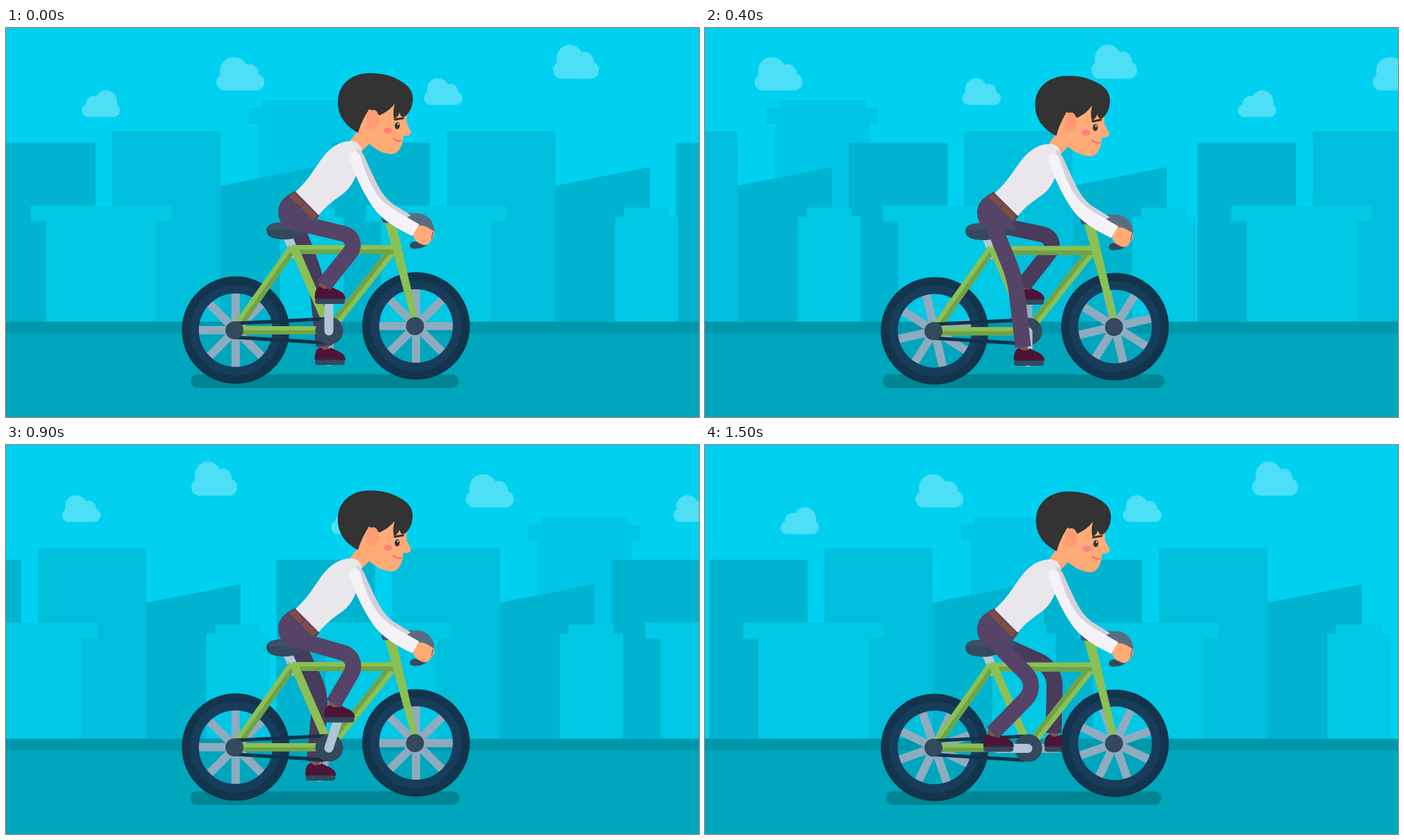
Animation, 998 px wide and 561 px high, one loop 1600 ms. Source, as an HTML page with a canvas:

```html
<!DOCTYPE html>
<html lang="en">
<head>
<meta charset="utf-8">
<title>City ride</title>
<style>
html, body { margin: 0; width: 100%; height: 100%; overflow: hidden; background: #00d1f1; }
canvas { display: block; width: 998px; height: 561px; }
</style>
</head>
<body>
<canvas id="stage" width="998" height="561"></canvas>
<script>
const ctx = document.getElementById('stage').getContext('2d');
const LOOP = 1600, STEP = 100, TAU = Math.PI * 2;
const NAVY = '#34495e', GREEN = '#8bc054', MOSS = '#6fa349', SKIN = '#ffab78', HAIR = '#333333';
const NEAR = '#554467', FAR = '#483b5b';

function rect(x, y, w, h, c) { ctx.fillStyle = c; ctx.fillRect(x, y, w, h); }
function shape(d, c) { ctx.fillStyle = c; ctx.fill(new Path2D(d)); }
function oval(x, y, rx, ry, c, turn = 0) {
  ctx.fillStyle = c;
  ctx.beginPath();
  ctx.ellipse(x, y, rx, ry, turn, 0, TAU);
  ctx.fill();
}
function pill(x, y, w, h, c) {
  ctx.fillStyle = c;
  ctx.beginPath();
  ctx.roundRect(x, y, w, h, h / 2);
  ctx.fill();
}
function line(x1, y1, x2, y2, w, c, cap = 'butt') {
  ctx.lineWidth = w;
  ctx.strokeStyle = c;
  ctx.lineCap = cap;
  ctx.beginPath();
  ctx.moveTo(x1, y1);
  ctx.lineTo(x2, y2);
  ctx.stroke();
}
function group(draw, dx = 0, dy = 0) {
  ctx.save();
  ctx.translate(dx, dy);
  draw();
  ctx.restore();
}

// Scenery
function cloud(x, y, w, h, flip) {
  group(() => {
    if (flip) ctx.translate(w, 0);
    ctx.scale((flip ? -w : w) / 69, h / 48);
    const c = '#4cdff6';
    pill(0, 24, 69, 24, c);
    oval(25, 20, 20, 20, c);
    oval(47, 24, 14, 14, c);
    rect(12, 24, 45, 14, c);
  }, x, y);
}
function clouds(s) {
  for (const dx of [-57.9 * s, 59.87 * (15 - s)]) {
    cloud(109 + dx, 90, 55, 38.5, true);
    cloud(303 + dx, 42, 69, 48);
    cloud(602 + dx, 72.5, 55.5, 38.5);
    cloud(788 + dx, 24, 66, 49);
  }
}
function tower() {
  const c = '#00c5e6';
  rect(60, 104, 124, 12, c);
  rect(41, 115, 161, 23, c);
  rect(54, 137, 136, 287, c);
}
function blocks() {
  rect(-322, 165.5, 142, 259, '#00b4cf');
  rect(-156, 149, 156, 275, '#00bfdc');
  shape('M0 227.5 L136 200.5 V424 H0 Z', '#00b4cf');
}
function fronts() {
  const c = '#00c8e5';
  rect(-273, 256, 203, 23, c);
  rect(-251, 278, 159, 146, c);
  rect(99, 259, 65, 14, c);
  rect(86, 272, 91, 152, c);
}
function city(s) {
  const a = 309 - 65.45 * s, b = 1287 - 63.94 * s;
  const all = [a, a + 482, b, b + 482];
  group(tower, a);
  group(tower, b);
  all.forEach(x => group(blocks, x));
  all.forEach(x => group(fronts, x));
  rect(0, 423.5, 998, 18, '#0097ac');
  rect(0, 440.5, 998, 121, '#00a6bb');
}

// Bicycle
function wheel(x, y, deg) {
  group(() => {
    ctx.rotate(deg * Math.PI / 180);
    for (let i = 0; i < 4; i++) {
      line(-56, 0, 56, 0, 12, '#8eabc0');
      ctx.rotate(Math.PI / 4);
    }
    for (const [r, w, c] of [[59.5, 13, '#173d5a'], [71.5, 12, '#12344c']]) {
      ctx.lineWidth = w;
      ctx.strokeStyle = c;
      ctx.beginPath();
      ctx.arc(0, 0, r, 0, TAU);
      ctx.stroke();
    }
  }, x, y);
}
function tube(x1, y1, x2, y2, w) {
  const len = Math.hypot(x2 - x1, y2 - y1);
  const nx = (y1 - y2) / len * w / 4, ny = (x2 - x1) / len * w / 4;
  line(x1, y1, x2, y2, w, GREEN);
  line(x1 + nx, y1 + ny, x2 + nx, y2 + ny, w / 2, MOSS);
}
function frame() {
  line(406, 302, 418, 330, 13, '#b3c8d8');
  tube(329, 436, 413, 317, 13);
  tube(557, 320, 473, 426, 13);
  tube(412, 319.5, 560, 319.5, 13);
  line(414, 315, 465, 432, 12, GREEN);
  shape('M545.5 279 L561 279 L593 418 L584 420 Z', GREEN);
  tube(335, 436, 452, 436, 12);
  line(330, 426, 460, 419.5, 5, '#12324a');
  line(330, 446, 460, 454, 5, '#12324a');
  oval(329, 436, 13, 13, NAVY);
  oval(589, 430, 13, 13, NAVY);
  oval(465.5, 436.5, 20, 20, NAVY);
}
function saddle() {
  shape('M375 292 C375 281 389 280 401 280.5 L441 282 C448 284 449 292 441 293.5 C425 296 420 305 402 305 C384 305 375 301 375 292 Z', NAVY);
  shape('M376 290 C378 281 390 280 401 280.5 L441 282 C445 283 447 287 446 290 Z', '#3e5266');
}
function handlebar() {
  shape('M541 274 C541 270 545 269 552 269 L584 267 L588 281 H545 C541 281 541 277 541 274 Z', '#465a6d');
  shape('M566 268 L591 267 C607 267 617 280 616.5 293 C616 300 612 306 607 310 L566 272 Z', '#586e80');
  shape('M606 303 L614 302 C609 313 602 318 588 318.5 C579 318 580 309 588 308 C596 308 601 307 606 303 Z', NAVY);
}

// Rider: knee positions over the eight-beat pedal cycle
const KNEE = [[0, 512, 303], [2, 504, 322], [2.8, 495, 335], [4, 447, 362], [6, 480, 348], [6.8, 483, 336], [8, 512, 303]];
function knee(p) {
  const i = KNEE.findIndex(k => k[0] > p);
  const [t0, x0, y0] = KNEE[i - 1], [t1, x1, y1] = KNEE[i];
  const f = (p - t0) / (t1 - t0);
  return [x0 + (x1 - x0) * f, y0 + (y1 - y0) * f];
}
function pedal(p, b) {
  const a = p * Math.PI / 4;
  return [465 + 44 * Math.sin(a), 437 + b - 44 * Math.cos(a)];
}
function crank(p, b, c) {
  const [x, y] = pedal(p, b);
  line(465, 437 + b, x, y, 13, c, 'round');
}
function leg(p, b, hx, hy, c) {
  const [fx, fy] = pedal(p, b);
  group(() => {
    rect(-14, -26, 14, 14, '#7b5650');
    shape('M-20 -2 C-21 -12 -18 -20 -12 -20 C-7 -15 -1 -17 3 -20 C11 -15 24 -13 24 -2 Z', '#4e1436');
    pill(-20, -3, 43, 8, NAVY);
    line(-18, -2.5, 22, -2.5, 1.5, '#2b3449');
  }, fx, fy);
  const [kx, ky] = knee(p);
  const ax = fx - 7, ay = fy - 22;
  // the bend starts at a fixed distance from the knee
  const bend = Math.atan2(hy - ky, hx - kx) - Math.atan2(ay - ky, ax - kx);
  const half = Math.acos(Math.cos(bend)) / 2;
  ctx.lineWidth = 23;
  ctx.strokeStyle = c;
  ctx.lineCap = 'butt';
  ctx.beginPath();
  ctx.moveTo(hx, hy);
  ctx.arcTo(kx, ky, ax, ay, 26 * Math.tan(half));
  ctx.lineTo(ax, ay);
  ctx.stroke();
}
function hips() {
  shape('M417 235 C401 242 391 252 392 267 C393 281 402 291 416 294 L438 288 L452 270 Z', NEAR);
  shape('M407.5 242 L415 238 L448.5 269.5 L442.5 276.5 Z', '#7f4e43');
  line(424, 259, 431, 251, 1.5, NEAR);
}
function torso() {
  shape('M417 236 C436 219 444 203 455 188 C467 172 481 163 496 163 C507 163 513 170 512 181 C508 206 502 224 489 236 C474 248 464 253 450.5 270 Z', '#e9e7ec');
}
function arm() {
  shape('M505 173 C514 176 518 190 526 207 C536 229 542 241 556 253 L583 270 L566 280 L515 220 Z', '#d4d1db');
  shape('M587 288 C593 283 600 284 606 287 L616 293 C618 298 616 303 612 306 C610 313 603 315 597 311 C588 308 584 300 587 288 Z', SKIN);
  line(615, 294, 613, 304, 1.5, '#8c5f55');
  shape('M495 191 C491 177 506 174 510.5 185 C517 209 527 233 541 248 C555 262 575 271 595 283 L585 300 C562 289 541 276 529 259 C514 237 504 215 495 191 Z', '#f4f2f7');
}
function head() {
  shape('M508 146 L520 112 L576 108 L577 137 L583 149 C584 154 580 156 572 155.5 C572 168 566 182 555 182 C541 181 531 174 523 167 L512 178 L493 166 Z', SKIN);
  shape('M507 151 C488 141 478 126 478 107 C478 80 499 65 524 65 C545 65 558 70 571 78 C584 86 588 97 585 110 C583 119 579 124 574 128 C569 129 568 126 567 122 C565 127 562 130 559 131 C557 124 558 117 560 109 C552 119 546 122 538 126 L523 117 C517 127 511 137 507 151 Z', HAIR);
  oval(528, 132, 9, 14, '#ff9b72', 0.1);
  oval(550, 148, 6, 4.3, '#ff7f7d');
  oval(563.5, 141, 3.6, 5, HAIR, 0.1);
  oval(564.5, 138.8, 1, 1.3, '#ffffff');
  line(560, 132, 572, 130, 3, HAIR, 'round');
  ctx.lineWidth = 1.8;
  ctx.strokeStyle = '#f0675f';
  ctx.stroke(new Path2D('M558 159 Q562 164 569 163'));
}

function draw(s) {
  // the pedalling eases off for a few beats mid-loop
  const p = (s - 0.2 * Math.min(5, Math.max(0, s - 6))) % 8;
  const far = (p + 4) % 8;
  const b = 1 - Math.abs(4 - p) / 4;
  const spin = s % 9 * 135 / 7;

  rect(0, 0, 998, 561, '#00d1f1');
  clouds(s);
  city(s);
  pill(266 - 10 * b, 499.5, 386 + 20 * b, 19.5, '#008594');

  crank(far, b, '#92aabe');
  leg(far, b, 417, 283, FAR);
  wheel(330.7, 435.7 + b, spin);
  wheel(590.5, 429.7 + b, spin);
  group(frame, 0, 1.2 * b);
  crank(p, b, '#b0c5d6');
  group(saddle, 0, b);
  leg(p, b, 413, 279, NEAR);
  group(hips, 0, b);
  group(() => {
    ctx.translate(565, 180);
    ctx.rotate(-2 * b * Math.PI / 180);
    ctx.translate(-565, -180);
    head();
  }, 0, 2.5 * b);
  group(() => {
    ctx.scale(1, 1 - 0.03 * b);
    ctx.translate(0, -270);
    torso();
  }, 0, 270 + b);
  group(handlebar, 0, 2.3 * b);
  group(arm, 0, 2.7 * b);
}

let last = -1;
function tick() {
  const s = Math.floor(performance.now() % LOOP / STEP);
  if (s !== last) draw(last = s);
  requestAnimationFrame(tick);
}
tick();
</script>
</body>
</html>
```
